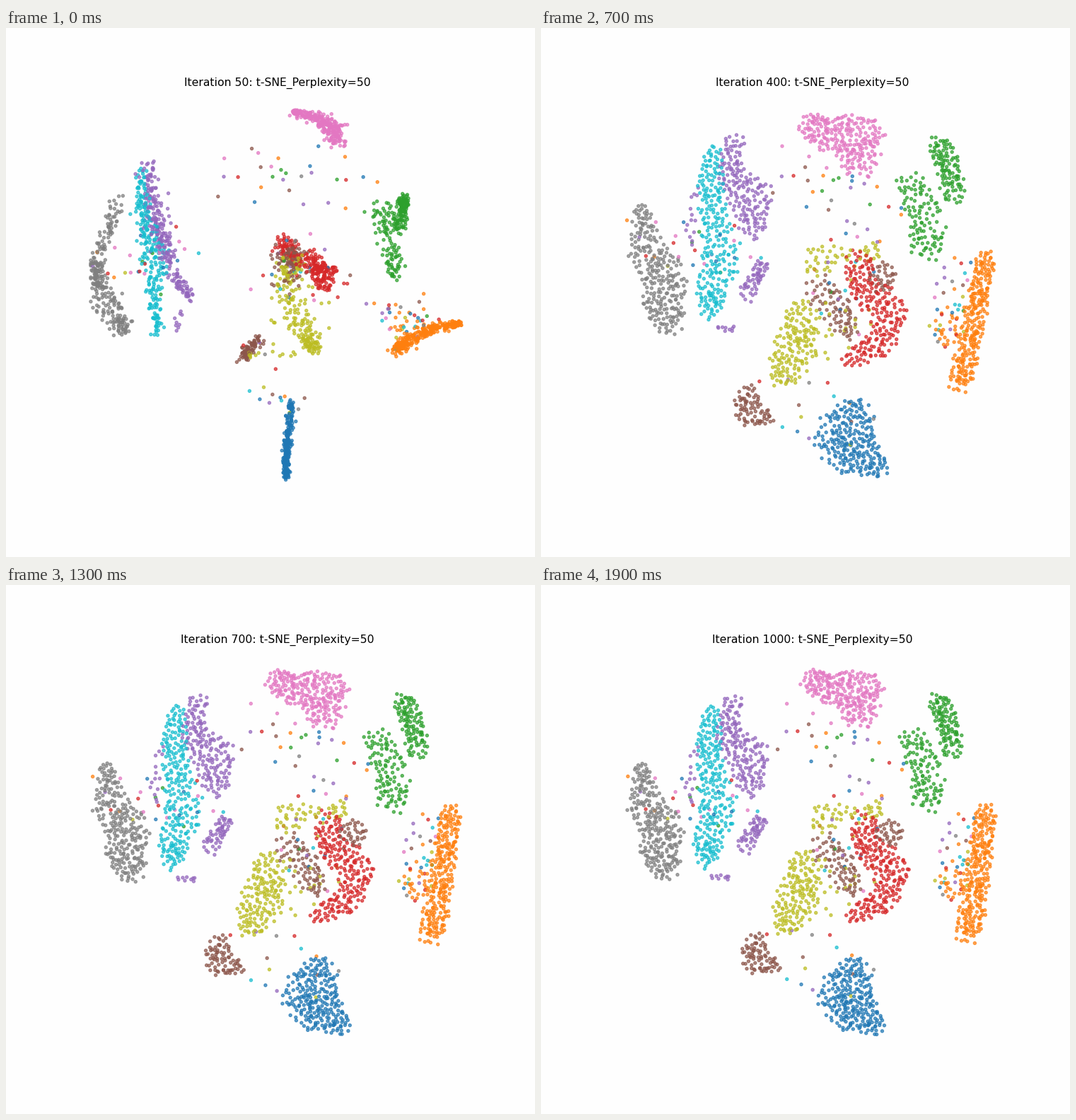
Animation of 748 by 748 pixels, one loop 2 s. Source, as a matplotlib script:

```python
import numpy as np
import matplotlib.pyplot as plt
from matplotlib.animation import FuncAnimation

SIZE, DPI = 748, 93.5
FRAMES, INTERVAL = 20, 100
STEP = 50

rng = np.random.default_rng(12)
late, mid, early, color = [], [], [], []


def in_disc(n):
    a = rng.uniform(0, 2 * np.pi, n)
    r = np.sqrt(rng.uniform(0, 1, n))
    return np.column_stack([r * np.cos(a), r * np.sin(a)])


def along(path, u, off):
    """Point at u on a path of (x, y, width), moved sideways by off * width."""
    knots = np.linspace(0, 1, len(path))
    x, y, w = (np.interp(u, knots, v) for v in zip(*path))
    return np.column_stack([x, y]) + off * w[:, None]


def spread(path, n, tries=4):
    """Fill the path, each time keeping the most isolated of a few tries."""
    spots, params = np.empty((0, 2)), []
    for _ in range(n):
        u, off = rng.uniform(0, 1, tries), in_disc(tries)
        xy = along(path, u, off)
        best = 0
        if len(spots):
            gap = np.linalg.norm(xy[:, None] - spots, axis=2).min(axis=1)
            best = gap.argmax()
        spots = np.vstack([spots, xy[best]])
        params.append((u[best], *off[best]))
    params = np.array(params)
    return spots, params[:, 0], params[:, 1:]


def swarm(col, n, end, start, shift=(0, 0), scale=(1, 1), shear=0):
    """Dots along the path start; they open out, then settle along end.
    shift, scale and shear turn the settled shape into the freshly opened one.
    """
    spots, u, off = spread(end, n)
    center = spots.mean(axis=0)
    rel = (spots - center) * scale
    rel[:, 0] += shear * rel[:, 1]
    off = off * np.exp(rng.normal(-.15, .35, (n, 1)))
    late.extend(spots + rng.normal(0, 1.2, (n, 2)))
    mid.extend(center + shift + rel + rng.normal(0, 3, (n, 2)))
    early.extend(along(start, u, off) + rng.normal(0, 1, (n, 2)))
    color.extend(col or f'C{rng.integers(10)}' for _ in range(n))


swarm('tab:blue', 245,
      [(450, 543, 16), (430, 575, 42), (440, 600, 33), (472, 622, 17)],
      [(404, 530, 5), (399, 580, 5), (396, 610, 4), (396, 636, 3)],
      (0, -4), (1.35, 1.08))

swarm('tab:orange', 265,
      [(630, 322, 15), (619, 385, 18), (615, 430, 18), (604, 491, 20)],
      [(642, 418, 4), (600, 426, 7), (572, 440, 9), (552, 453, 8)],
      (-18, 22), (.7, 1.05), -.23)
swarm('tab:orange', 22, [(582, 420, 22)], [(565, 420, 35)], (-25, 15), (1, 1.5))

swarm('tab:green', 110,
      [(562, 165, 15), (574, 190, 18), (583, 235, 14)],
      [(562, 243, 8), (562, 250, 8), (557, 280, 8)],
      (5, 5), (1.2, 1.1))
swarm('tab:green', 110,
      [(525, 220, 20), (548, 262, 24), (543, 303, 24)],
      [(532, 262, 24), (545, 290, 16), (548, 350, 10)],
      (-5, 17), (1.3, 1.2))

swarm('tab:red', 222,
      [(453, 336, 20), (464, 375, 22), (500, 398, 25), (487, 445, 20),
       (440, 467, 11)],
      [(385, 300, 8), (430, 330, 18), (452, 345, 16), (450, 362, 22)],
      (-18, -8), (1.15, 1.2), .05)

swarm('tab:purple', 175,
      [(272, 167, 14), (263, 207, 18), (292, 243, 30), (297, 285, 18)],
      [(203, 195, 11), (205, 240, 12), (214, 285, 14), (232, 330, 9)],
      (10, -12), (1.1, 1.1))
swarm('tab:purple', 52, [(309, 333, 9), (290, 366, 15)],
      [(236, 350, 9), (262, 380, 7)], (10, 15), (.85, 1.3))
swarm('tab:purple', 14, [(216, 230, 9), (210, 305, 9)],
      [(215, 240, 20), (225, 340, 25)], (3, -5))
swarm('tab:purple', 9, [(238, 412, 1), (268, 415, 3)],
      [(245, 400, 8), (242, 428, 4)], (25, 37), (1, 2), -.5)

swarm('tab:brown', 77,
      [(300, 505, 17), (302, 530, 19), (332, 540, 9)],
      [(356, 440, 8), (340, 459, 9), (336, 463, 6)],
      (-33, 42), (1.1, 1.05))
swarm('tab:brown', 75, [(402, 371, 24), (422, 396, 22), (443, 430, 13)],
      [(402, 320, 14), (398, 345, 30)], (-20, 0), (1.15, 1))
swarm('tab:brown', 32, [(493, 350, 18)], [(405, 322, 18)], (-30, 2), (1, 1.4))

swarm('tab:pink', 245,
      [(381, 134, 16), (412, 150, 24), (454, 148, 31), (447, 185, 26)],
      [(405, 119, 4), (437, 126, 8), (458, 140, 13), (470, 160, 12)],
      (-5, 15), (1.15, 1.3))

swarm('tab:gray', 255,
      [(142, 258, 9), (148, 315, 28), (175, 343, 31), (165, 375, 28),
       (178, 402, 20)],
      [(160, 245, 12), (128, 330, 11), (130, 360, 12), (148, 398, 22),
       (170, 427, 11)],
      (10, 25), (1.15, 1.38), .07)

swarm('tab:olive', 50, [(400, 332, 22), (408, 330, 20), (480, 316, 11)],
      [(403, 340, 20)], (-22, -2), (1.15, 1.3))
swarm('tab:olive', 155,
      [(372, 393, 22), (368, 425, 30), (360, 455, 32), (343, 484, 12)],
      [(395, 360, 25), (412, 410, 26), (434, 443, 16), (432, 452, 11)],
      (-14, 36), (1.1, 1.07))
swarm('tab:olive', 14, [(415, 430, 45)], [(340, 464, 4), (415, 460, 6)])

swarm('tab:cyan', 245,
      [(243, 180, 11), (238, 215, 18), (241, 265, 21), (252, 315, 29),
       (238, 355, 21), (234, 388, 15)],
      [(193, 205, 7), (192, 245, 9), (200, 290, 16), (214, 325, 22),
       (208, 375, 10), (215, 430, 9)],
      (12, 14), (1.1, 1.25), .04)

# misplaced dots of any colour
swarm(None, 28, [(350, 200, 45), (475, 265, 45)],
      [(310, 210, 35), (480, 220, 60)], (-15, 5), (1.1, 1.1))
swarm(None, 32, [(595, 330, 22), (575, 435, 28)],
      [(520, 410, 35), (600, 415, 30)], (-20, 12), (1.2, 1.1))
swarm(None, 24, [(155, 290, 40), (285, 315, 35)],
      [(150, 330, 40), (250, 310, 45)], (5, 10), (1.1, 1.2))
swarm(None, 26, [(440, 320, 50), (430, 430, 50)],
      [(400, 340, 70), (410, 380, 70)], (-18, 0))
swarm(None, 16, [(325, 500, 28), (440, 560, 60)],
      [(340, 440, 40), (400, 550, 25)], (-15, 25), (1.2, 1))

order = rng.permutation(len(late))
late, mid, early = (np.array(v)[order] for v in (late, mid, early))
color = [color[i] for i in order]


def layout(it):
    if it < 150:
        pts = early + (mid - early) * ((it - 50) / 100) ** 2
    else:
        k = np.expm1((150 - it) / 220) / np.expm1(-850 / 220)
        pts = mid + (late - mid) * k
    return np.clip(pts, [119.9, 116], [646.8, 639.5])


fig = plt.figure(figsize=(SIZE / DPI, SIZE / DPI), dpi=DPI, facecolor='#fefefe')
ax = fig.add_axes([.125, .11, .775, .77])
ax.set_xlim(.125 * SIZE, .9 * SIZE)
ax.set_ylim(.89 * SIZE, .12 * SIZE)
ax.axis('off')
dots = ax.scatter(late[:, 0], late[:, 1], s=10, c=color, alpha=.7, linewidths=1)
title = ax.set_title('', fontsize=12, fontfamily='DejaVu Sans')


def draw(i):
    it = STEP * (i + 1)
    dots.set_offsets(layout(it))
    title.set_text(f'Iteration {it}: t-SNE_Perplexity=50')
    return dots, title


anim = FuncAnimation(fig, draw, frames=FRAMES, interval=INTERVAL,
                     repeat=True, repeat_delay=0)
plt.show()
```
